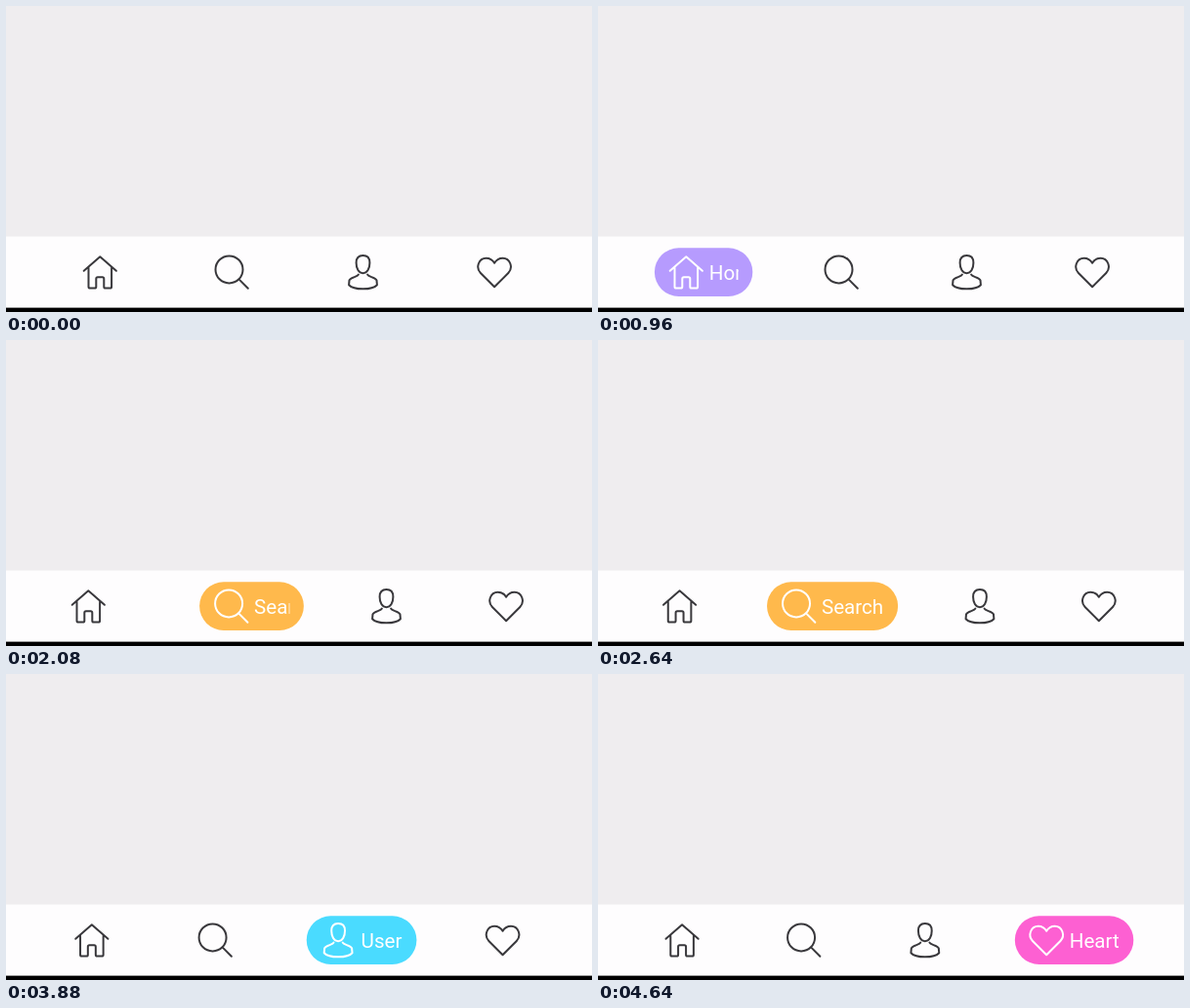
Recreate the animation shown at these times as an HTML page. Size 600 px wide and 314 px high, loop 5.96 s.

```html
<!DOCTYPE html>
<html lang="en">
<head>
<meta charset="utf-8">
<title>Bubble tab bar</title>
<style>
  html, body { margin: 0; width: 100%; height: 100%; overflow: hidden; background: #efedef; }
  svg { display: block; width: 100%; height: 100%; }
  .icon { fill: none; stroke-width: 2; stroke-linecap: round; stroke-linejoin: round; }
  text { font: 20.6px Roboto, Arial, sans-serif; fill: #fff; }
</style>
</head>
<body>
<svg viewBox="0 0 600 314">
  <defs>
    <clipPath id="reveal"><rect id="window" y="250" height="46"/></clipPath>
  </defs>
  <rect width="600" height="314" fill="#efedef"/>
  <rect y="236.5" width="600" height="78" fill="#fefdfe"/>
  <rect y="309.6" width="600" height="5" fill="#000"/>
  <rect id="pill" y="248.3" height="49.6" rx="24.8"/>
  <g id="icons"></g>
  <g clip-path="url(#reveal)"><text id="label" y="281.2"></text></g>
</svg>
<script>
const LOOP = 5960, STEP = 40, DURATION = 450;
const BAR_LEFT = -0.3, BAR_WIDTH = 602.6;
const ITEM = 70.4, ICON_X = 32.4, ICON_Y = 273, TEXT_X = 55.9, PAD_RIGHT = 14.5;
const INK = '#39383c';

// `at` is the first frame of the selection, `lead` the time already elapsed by then
const tabs = [
  { label: 'Home', extra: 55, color: '#b69bfe', at: 800, lead: 6,
    path: 'M-16.6-1.2L0-15.7L16.6-1.2M-11.8-4.6V15Q-11.8 16.6-10.2 16.6H-5.5Q-4 16.6-4 15V6.8' +
          'Q-4 5.2-2.4 5.2H2.4Q4 5.2 4 6.8V15Q4 16.6 5.5 16.6H10.2Q11.8 16.6 11.8 15V-4.6' },
  { label: 'Search', extra: 63.7, color: '#ffb94c', at: 1920, lead: 11,
    path: 'M11.6-2.6A14 14 0 1 1-16.4-2.6A14 14 0 1 1 11.6-2.6M7.6 7.4L16.9 16.8' },
  { label: 'User', extra: 42.3, color: '#4adbff', at: 3080, lead: 0,
    path: 'M0-17C4.6-17 6.9-14.2 6.9-9.5C6.9-3.5 4.4 1.2 0 1.2C-4.4 1.2-6.9-3.5-6.9-9.5C-6.9-14.2-4.6-17 0-17Z' +
          'M-4.6 2.6C-5.6 5.2-12.4 5-14 8.4L-14.4 13.2C-12 15.8-6.5 17.3 0 17.3' +
          'S12 15.8 14.4 13.2L14 8.4C12.4 5 5.6 5.2 4.6 2.6' },
  { label: 'Heart', extra: 51.1, color: '#fd60d2', at: 3920, lead: 5,
    path: 'M0 15.2L-14.2 1C-19.6-4.6-16-14.3-8.5-14.3C-4.4-14.3-1.6-12 0-9.2' +
          'C1.6-12 4.4-14.3 8.5-14.3C16-14.3 19.6-4.6 14.2 1Z' }
];

const byId = id => document.getElementById(id);
const pill = byId('pill'), label = byId('label'), reveal = byId('window');

function setAttrs(node, attrs) {
  for (const name in attrs) node.setAttribute(name, attrs[name]);
}

for (const tab of tabs) {
  tab.icon = document.createElementNS('http://www.w3.org/2000/svg', 'path');
  setAttrs(tab.icon, { class: 'icon', d: tab.path });
  byId('icons').append(tab.icon);
}

// cubic-bezier(.4, 0, .2, 1), solved by bisection
function ease(x) {
  if (x <= 0) return 0;
  if (x >= 1) return 1;
  let low = 0, high = 1;
  for (let i = 0; i < 24; i++) {
    const s = (low + high) / 2, r = 1 - s;
    if (1.2 * s * r * r + 0.6 * s * s * r + s * s * s < x) low = s;
    else high = s;
  }
  return low * low * (3 - 2 * low);
}

function render(time) {
  const active = tabs.filter(tab => time >= tab.at).length - 1;
  const current = tabs[active];
  const progress = current ? ease((time - current.at + current.lead) / DURATION) : 0;
  const widths = tabs.map((tab, i) =>
    ITEM + tab.extra * (i === active ? progress : i === active - 1 ? 1 - progress : 0));
  const gap = (BAR_WIDTH - widths.reduce((sum, w) => sum + w, 0)) / (tabs.length + 1);

  let x = BAR_LEFT + gap;
  tabs.forEach((tab, i) => {
    const selected = i === active;
    setAttrs(tab.icon, {
      transform: `translate(${x + ICON_X} ${ICON_Y})`,
      stroke: selected ? '#fff' : INK
    });
    if (selected) {
      setAttrs(pill, { x, width: widths[i], fill: tab.color });
      setAttrs(label, { x: x + TEXT_X });
      setAttrs(reveal, { x: x + TEXT_X, width: Math.max(0, widths[i] - TEXT_X - PAD_RIGHT) });
      label.textContent = tab.label;
    }
    x += widths[i] + gap;
  });
  pill.style.display = label.style.display = current ? '' : 'none';
}

const start = performance.now();
function tick() {
  const time = (performance.now() - start) % LOOP;
  render(Math.floor(time / STEP) * STEP);
  requestAnimationFrame(tick);
}
tick();
</script>
</body>
</html>
```
